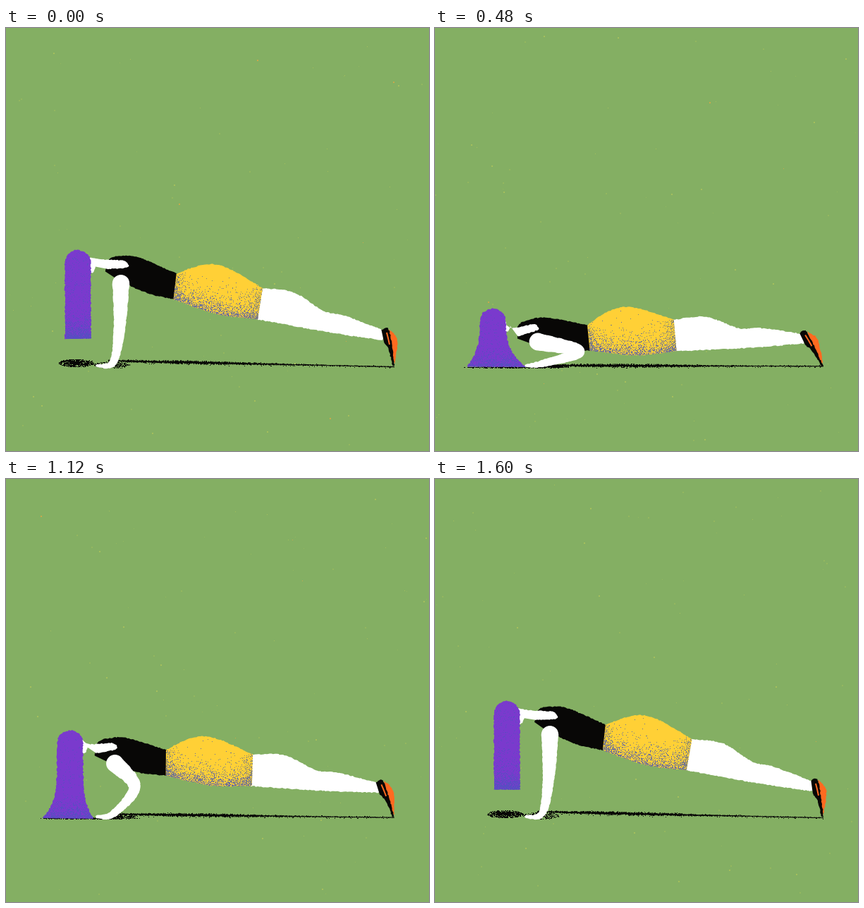
An HTML page with a canvas that plays this animation: 600x600 px, repeating every 1680 ms.

```html
<!DOCTYPE html>
<html lang="en">
<head>
<meta charset="utf-8">
<title>Push-up</title>
<style>
  html, body { margin: 0; width: 100%; height: 100%; overflow: hidden; background: #84af63; }
  canvas { display: block; width: 600px; height: 600px; }
</style>
</head>
<body>
<canvas id="stage" width="600" height="600"></canvas>
<script>
const ctx = document.getElementById('stage').getContext('2d');
const LOOP = 1680, STEP = 80, GROUND = 481;
const GREEN = '#84af63', BLACK = '#080706', WHITE = '#fff', YELLOW = '#ffd036';
const ORANGE = '#ff6a20', PURPLE = '#7a3acd', BLUE = '#5a4cc2';

// Key points of the raised pose: an upper and a lower edge for each part.
const leg = [[[362,369], [408,375], [450,401], [480,408], [538,430]], [[535,443], [460,432], [355,413]]];
const torso = [[[141,345], [147,327], [165,323], [190,326], [243,349]], [[239,385], [200,376], [160,358]]];
const shorts = [[[242,349], [267,339], [293,335], [320,343], [364,369]], [[357,413], [300,406], [238,385]]];
const sole = [[[544,427], [555,443], [551,477]], [[545,455], [544,440]]];
const shoe = [[[533,428], [542,426], [547,447], [551,479]], [[548,479], [543,457], [536,446]]];
const lace = [[540,432], [542,440], [544,449]];

let seed = 1;
function rnd() {
  seed = (seed + 0x6d2b79f5) | 0;
  let t = Math.imul(seed ^ (seed >>> 15), 1 | seed);
  t = (t + Math.imul(t ^ (t >>> 7), 61 | t)) ^ t;
  return ((t ^ (t >>> 14)) >>> 0) / 4294967296;
}
const jitter = size => (rnd() - .5) * size;
const falloff = scale => -Math.log(1 - rnd()) * scale;
const mix = (a, b, k) => a + (b - a) * k;
const mixPoint = (a, b, k) => [mix(a[0], b[0], k), mix(a[1], b[1], k)];
const clamp = v => Math.max(0, Math.min(1, v));
const dot = (x, y, size = 1) => ctx.fillRect(Math.round(x), Math.round(y), size, size);

function ease(t, power) {
  t = clamp(t);
  return t < .5 ? Math.pow(2 * t, power) / 2 : 1 - Math.pow(2 - 2 * t, power) / 2;
}
const bendAt = ms => ms < 720 ? ease(ms / 480, 3.2) : 1 - ease((ms - 880) / 480, 2.5);

// The body swings about the toes while the ankle slides back a little.
function swing([x, y], bend) {
  const angle = .227 * bend, dx = x - 550, dy = y - 480;
  const slide = 4.5 * bend * clamp(-dy / 50);
  return [550 + dx * Math.cos(angle) + dy * Math.sin(angle) - slide,
          480 + dy * Math.cos(angle) - dx * Math.sin(angle)];
}
const swingAll = (pts, bend) => pts.map(p => swing(p, bend));

// Catmull-Rom curve through points of any dimension, sampled about every two pixels.
function curve(pts) {
  const out = [];
  for (let i = 0; i < pts.length - 1; i++) {
    const b = pts[i], c = pts[i + 1], a = pts[i - 1] || b, d = pts[i + 2] || c;
    const n = Math.max(1, Math.round(Math.hypot(c[0] - b[0], c[1] - b[1]) / 2));
    for (let k = 0; k < n; k++) {
      const t = k / n;
      out.push(b.map((v, j) => v + .5 * t * (c[j] - a[j] +
        t * (2 * a[j] - 5 * v + 4 * c[j] - d[j] + t * (3 * (v - c[j]) + d[j] - a[j])))));
    }
  }
  out.push(pts[pts.length - 1]);
  return out;
}

function fillRough(edges, color, rough = 1.3) {
  ctx.beginPath();
  for (const [x, y] of edges.flatMap(curve)) ctx.lineTo(x + jitter(rough), y + jitter(rough));
  ctx.closePath();
  ctx.fillStyle = color;
  ctx.fill();
}

const drawPart = (part, bend, color) => fillRough(part.map(e => swingAll(e, bend)), color);

function drawDust() {
  for (let i = 0; i < 85; i++) {
    const kind = rnd();
    ctx.fillStyle = kind < .06 ? '#c9a94c' : kind < .45 ? '#a5bf5c' : '#94b75f';
    dot(rnd() * 598, 5 + rnd() * 590, rnd() < .5 ? 2 : 1);
  }
}

function spray(cx, cy, rx, ry, count) {
  for (let i = 0; i < count; i++) {
    const a = rnd() * Math.PI * 2, r = Math.pow(rnd(), .75);
    dot(cx + Math.cos(a) * r * rx, cy + Math.sin(a) * r * ry);
  }
}

function drawShadow(bend, hairLeft) {
  ctx.fillStyle = BLACK;
  for (let x = 145; x < 551; x++) {
    const y = mix(472, 478.6, bend) + (x - 150) * mix(.0215, .003, bend);
    const half = .8 + 1.7 * Math.exp(-Math.pow((x - 270) / 105, 2));
    const top = y - half * (.4 + rnd() * .8);
    ctx.fillRect(x, top, 1, y + half * (.4 + rnd() * .8) - top);
    if (rnd() < .4) dot(x, y + jitter(half * 2 + 2));
  }
  const touch = clamp(bend / .45);
  const left = mix(74, hairLeft - 5, touch), right = mix(125, 190, touch);
  spray((left + right) / 2, mix(475, 481, touch), (right - left) / 2, mix(5.5, 1.2, touch), mix(800, 420, touch));
  spray(mix(150, 160, bend), mix(477.5, 480, bend), mix(26, 32, bend), mix(5, 1.5, bend), 380);
}

function drawShorts(bend) {
  const [top, bottom] = shorts.map(e => swingAll(e, bend));
  fillRough([top, bottom], YELLOW);
  ctx.save();
  ctx.clip();
  const hem = curve(bottom);
  for (let i = 0; i < 1500; i++) {
    ctx.fillStyle = rnd() < .6 ? '#7a7c88' : '#6468a8';
    const [x, y] = hem[Math.floor(rnd() * hem.length)];
    dot(x + jitter(3), y - falloff(10));
  }
  ctx.fillStyle = '#8d8a70';
  for (let i = 0; i < 220; i++) {
    const [rx, ry] = mixPoint(top[top.length - 1], bottom[0], rnd());
    dot(rx - falloff(7), ry);
    const [lx, ly] = mixPoint(top[0], bottom[bottom.length - 1], rnd());
    if (i % 2) dot(lx + falloff(4), ly);
  }
  ctx.restore();
}

function drawShoe(bend) {
  drawPart(sole, bend, ORANGE);
  drawPart(shoe, bend, BLACK);
  ctx.beginPath();
  for (const [x, y] of curve(swingAll(lace, bend))) ctx.lineTo(x, y);
  ctx.strokeStyle = ORANGE;
  ctx.lineWidth = 2;
  ctx.stroke();
}

function drawNeck(bend, [hx, hy]) {
  const face = (dx, dy) => [hx + dx, hy + dy];
  const nape = swingAll([[135,328], [166,330], [173,335], [171,340], [142,342]], bend);
  fillRough([[face(15, 10), ...nape], [face(25, 24), face(21, 32), face(16, 31)]], WHITE);
}

// Arm as a tapering brush stroke: x, y and radius at each joint.
function drawArm(bend) {
  const lift = 20 * bend * (1 - bend);
  const joints = [
    [mix(163, 146, bend), mix(362, 445, bend), 12],
    [mix(161, 204, bend), mix(425, 459, bend) - lift, 8.3],
    [152, mix(474, 476, bend), 5],
    [129, 479, 2]
  ];
  ctx.fillStyle = WHITE;
  ctx.beginPath();
  for (const [x, y, r] of curve(joints)) {
    ctx.moveTo(x, y);
    ctx.arc(x, y, r + jitter(1), 0, Math.PI * 2);
  }
  ctx.fill();
}

// Hair hangs as a tube and flares out at its base when it meets the ground.
function hairShape(ms, bend) {
  const head = [102 - 20 * Math.pow(bend, .85), mix(315, 398, bend)];
  const [cx, top] = head, radius = 18.5;
  const crown = top + radius, base = Math.min(top + 125.5, GROUND);
  const sag = clamp((top + 125.5 - GROUND) / 42);
  const spread = ms < 880 ? 1 - Math.pow(1 - clamp((ms - 200) / 520), 2)
                          : 1 - Math.pow(clamp((ms - 880) / 400), 4);
  const flareLeft = 24 * spread, flareRight = 16 * (spread + sag);
  const side = (sign, flare) => Array.from({ length: 9 }, (_, i) =>
    [cx + sign * (radius + flare * Math.pow(i / 8, mix(5, 2.8, sag))), mix(crown, base, i / 8)]);
  const dome = Array.from({ length: 9 }, (_, i) =>
    [cx - Math.cos(i / 8 * Math.PI) * radius, crown - Math.sin(i / 8 * Math.PI) * radius]);
  return { head, base, left: cx - radius - flareLeft, right: cx + radius + flareRight,
           edges: [side(-1, flareLeft).reverse(), dome, side(1, flareRight)] };
}

function drawHair({ edges, head, base, left, right }) {
  fillRough(edges, PURPLE, 1.8);
  ctx.save();
  ctx.clip();
  ctx.fillStyle = BLUE;
  for (let i = 0; i < 1200; i++) {
    const depth = i < 280 ? rnd() * (base - head[1]) : falloff(9);
    dot(mix(left, right, rnd()), base - depth);
  }
  ctx.restore();
}

function draw(frame) {
  const ms = frame * STEP, bend = bendAt(ms), hair = hairShape(ms, bend);
  seed = frame * 7919 + 17;
  ctx.fillStyle = GREEN;
  ctx.fillRect(0, 0, 600, 600);
  drawDust();
  drawShadow(bend, hair.left);
  drawPart(leg, bend, WHITE);
  drawShoe(bend);
  drawPart(torso, bend, BLACK);
  drawShorts(bend);
  drawNeck(bend, hair.head);
  drawHair(hair);
  drawArm(bend);
}

const start = performance.now();
let shown = -1;
function tick() {
  let frame = Math.floor(((performance.now() - start) % LOOP) / STEP);
  if (frame === 10) frame = 9; // held pose
  if (frame !== shown) draw(shown = frame);
  requestAnimationFrame(tick);
}
tick();
</script>
</body>
</html>
```
